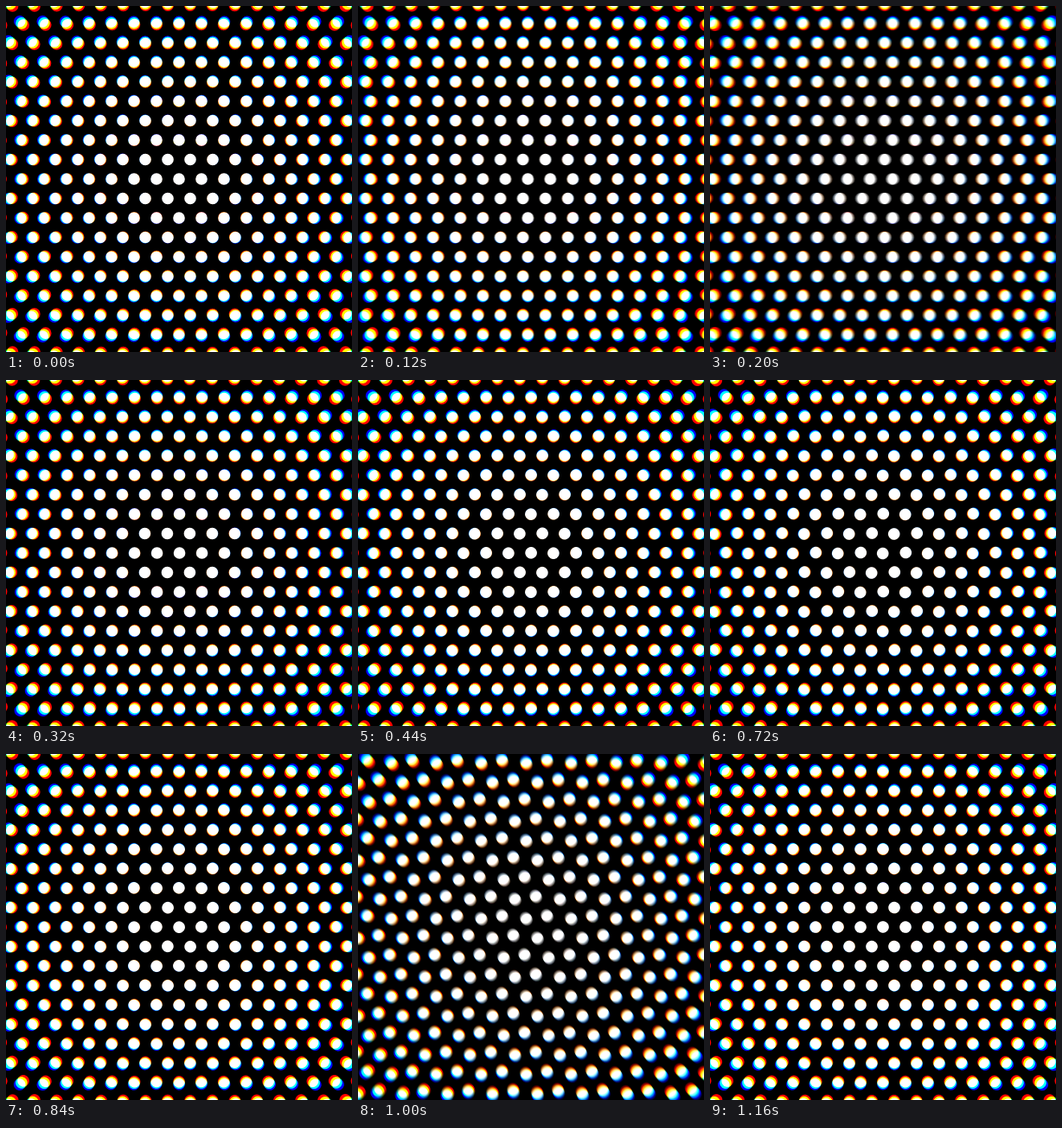
An HTML page with a canvas for the animation above (1.2 s loop, 400 by 400 pixels).

```html
<!DOCTYPE html>
<html lang="en">
<head>
<meta charset="utf-8">
<title>Sliding dots</title>
<style>
  html, body { margin: 0; width: 100%; height: 100%; overflow: hidden; background: #000; }
  canvas { display: block; width: 400px; height: 400px; }
</style>
</head>
<body>
<canvas id="stage" width="400" height="400"></canvas>
<script>
  const ctx = document.getElementById('stage').getContext('2d');
  const STEP = 40, STEPS = 30, PHASE = 10;    // ms per step, steps per loop, steps per slide
  const GAP = 26, ROW = GAP * Math.sqrt(3) / 2, RADIUS = 6.8;
  const SAMPLES = 8, SHUTTER = 0.6;           // motion blur
  const FRINGE = 3 / (254 * 254);             // colour spread grows with distance squared
  const CHANNELS = [['rgb(32,0,0)', -1], ['rgb(0,32,0)', 0], ['rgb(0,0,32)', 1]];

  const ease = p => p < 0.5 ? 4 * p ** 3 : 1 - 4 * (1 - p) ** 3;

  function drawDots(color, side, shift) {
    ctx.fillStyle = color;
    ctx.beginPath();
    for (let j = -13; j <= 13; j++) {
      const odd = Math.abs(j % 2);
      const y = j * ROW;
      for (let i = -13; i <= 13; i++) {
        const x = (i + odd / 2) * GAP + (odd ? shift : -shift);
        const r = Math.hypot(x, y);
        if (r > 300) continue;
        const k = 1 + side * FRINGE * r;
        ctx.moveTo(x * k + RADIUS, y * k);
        ctx.arc(x * k, y * k, RADIUS, 0, 2 * Math.PI);
      }
    }
    ctx.fill();
  }

  function draw(step) {
    ctx.setTransform(1, 0, 0, 1, 0, 0);
    ctx.globalCompositeOperation = 'source-over';
    ctx.fillStyle = '#000';
    ctx.fillRect(0, 0, 400, 400);

    ctx.globalCompositeOperation = 'lighter';
    ctx.translate(200, 200);
    ctx.rotate(Math.floor(step / PHASE) * 2 * Math.PI / 3);
    for (let s = 0; s < SAMPLES; s++) {
      const p = (step % PHASE + s * SHUTTER / SAMPLES) / PHASE;
      const shift = GAP * ease(p);
      for (const [color, side] of CHANNELS) drawDots(color, side, shift);
    }
  }

  const start = performance.now();
  let last = -1;
  function tick() {
    const step = Math.floor((performance.now() - start) / STEP) % STEPS;
    if (step !== last) draw(last = step);
    requestAnimationFrame(tick);
  }
  tick();
</script>
</body>
</html>
```
